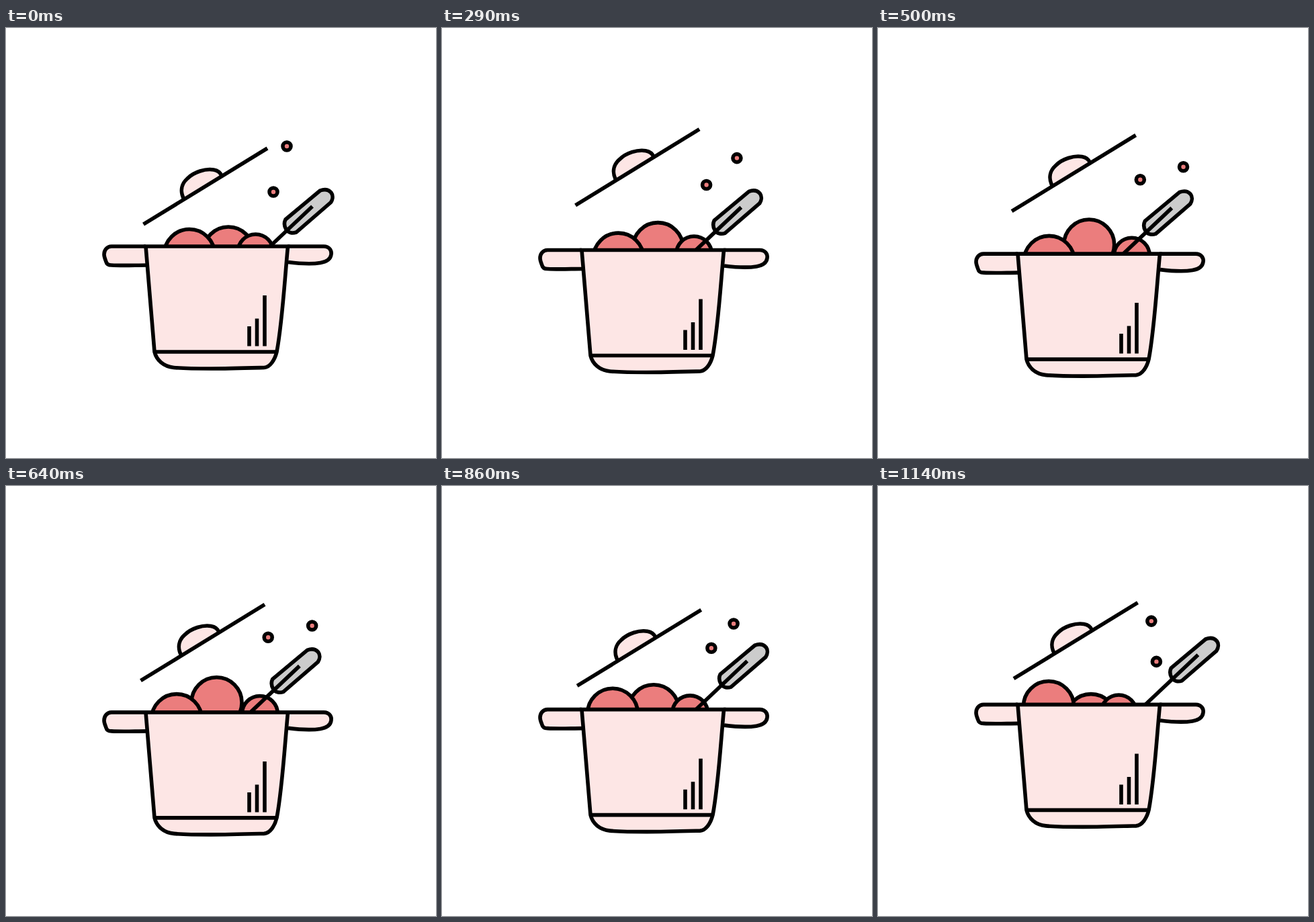
These frames come from a looping animation (640x640 px, 1.21 s). An HTML page:

```html
<!DOCTYPE html>
<html lang="en">
<head>
<meta charset="utf-8">
<title>Cooking pot</title>
<style>
  html, body { margin: 0; width: 100%; height: 100%; overflow: hidden; background: #fff; }
  svg { display: block; width: 100%; height: 100%; }
  .ink { stroke: #000; stroke-width: 5.6; }
  .pink { fill: #fde6e5; }
  .red { fill: #eb7d7d; }
  .gray { fill: #ccc; }
  .line { fill: none; }
</style>
</head>
<body>
<svg viewBox="0 0 640 640">
  <g class="ink">
    <g id="lid">
      <path class="pink" d="M265 255C258 242 262 231 270 224C280 214 297 209 309 211C315 212 319 215 321 220"/>
      <path class="line" d="M204.5 292.2L389 179"/>
    </g>
    <circle id="ballMiddle" class="red" r="37.5"/>
    <circle id="ballLeft" class="red" r="37.5"/>
    <circle id="ballRight" class="red" r="26.5"/>
    <g id="spoon">
      <path class="gray" d="M416 285L467.5 242C474 239.5 480 240.5 484 245C487 249 486.5 255 483.5 259.5L432 304C426 306 420 304.5 417 300C414 295 413.5 290 416 285Z"/>
      <path class="line" d="M456 265.5L374 343"/>
    </g>
    <g id="pot">
      <path class="pink" d="M208 325H157C150 325 146 331 146 337C146 341 148 345 149 348C150 352 153 353 157 353C175 354 192 353 210 353"/>
      <path class="pink" d="M419 325H473C481 325 485 331 484 337C483 345 477 348 468 349.5C453 352 436 350.5 420 348.5"/>
      <path class="pink" d="M208 325L221 482C224 494 234 504 250 505.5C268 507 290 507 305 507C330 507 365 506 384 505.5C393 505 400 494 403 482C411 440 414 385 419.5 325Z"/>
      <path class="line" d="M219 482H405M362 444V473.5M373.5 432.5V473.5M385 398V473.5"/>
    </g>
    <circle id="dropHigh" class="red" r="6"/>
    <circle id="dropLow" class="red" r="6"/>
  </g>
</svg>
<script>
  const LOOP = 1210, STEPS = 17, HALF = STEPS / 2;

  // Eased progress along a cubic Bezier with handles at (x1, 0) and (x2, 1).
  function ease(x, x1 = .4, x2 = .45) {
    let low = 0, high = 1, s;
    for (let i = 0; i < 20; i++) {
      s = (low + high) / 2;
      const at = 3 * s * (1 - s) * (x1 * (1 - s) + x2 * s) + s ** 3;
      if (at < x) low = s; else high = s;
    }
    return s * s * (3 - 2 * s);
  }

  const mix = (a, b, u) => a.map((v, i) => v + (b[i] - v) * u);

  function place(id, [x, y]) {
    document.getElementById(id).setAttribute('transform', `translate(${x} ${y})`);
  }

  // Each part glides to a turning point at half time, then on to its end.
  const paths = {
    ballLeft: [[273, 337], [254, 347.3], [254, 327.7]],
    ballMiddle: [[331, 333.5], [313.5, 322], [317, 347.5]],
    ballRight: [[371.5, 333.5], [378, 339], [358, 337.5]],
    spoon: [[0, 0], [-19.5, 2.5], [21, -14.5]],
    dropHigh: [[418, 176], [456, 208], [406, 201]],
    dropLow: [[398, 244], [390, 225], [414.8, 262]]
  };

  const REST = [0, 0], TOP = [-6.2, -29.7], LOW = [-3.3, 5.3], END = [-2.4, -6];
  const TOP_STEP = 4.6, LOW_STEP = 11.8;

  // The lid is already moving at the start, so its first rise has a short ease-in.
  function lidOffset(step) {
    if (step < TOP_STEP) return mix(REST, TOP, ease(step / TOP_STEP, .1, .7));
    if (step < LOW_STEP) return mix(TOP, LOW, ease((step - TOP_STEP) / (LOW_STEP - TOP_STEP)));
    return mix(LOW, END, ease((step - LOW_STEP) / (STEPS - LOW_STEP)));
  }

  function draw(time) {
    const step = Math.floor((time % LOOP + 5) / LOOP * STEPS) % STEPS;
    const leg = step < HALF ? 0 : 1;
    const progress = ease(step / HALF - leg);
    place('pot', [0, 6 * (1 - Math.cos(2 * Math.PI * step / STEPS))]);
    place('lid', lidOffset(step));
    for (const [id, points] of Object.entries(paths)) {
      place(id, mix(points[leg], points[leg + 1], progress));
    }
  }

  const start = performance.now();
  function tick() {
    draw(performance.now() - start);
    requestAnimationFrame(tick);
  }
  tick();
</script>
</body>
</html>
```
